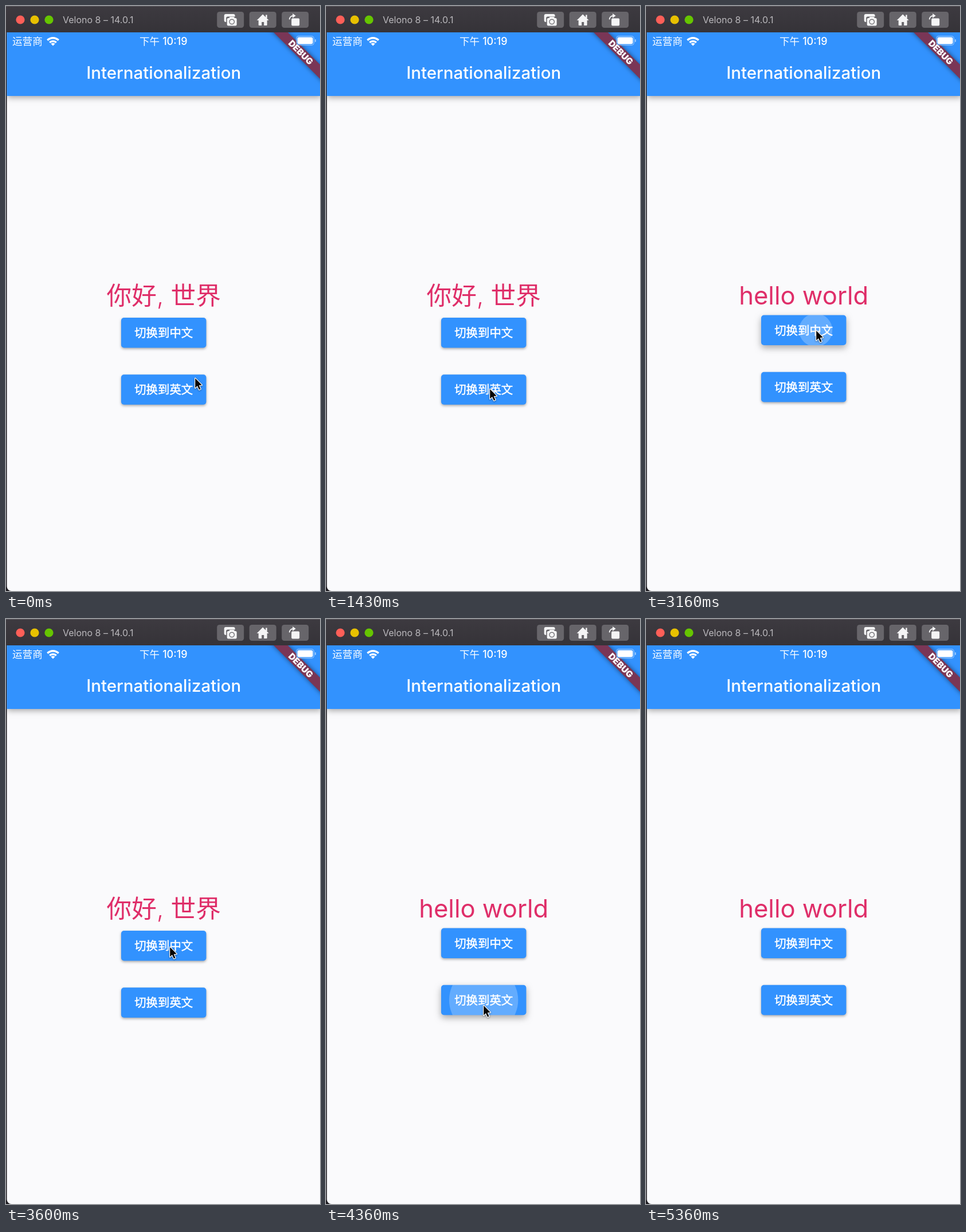
Animation of 548x1021 px, one loop 6730 ms. Source, as an HTML page with a canvas:

```html
<!DOCTYPE html>
<html lang="zh-CN">
<head>
<meta charset="utf-8">
<title>Internationalization</title>
<style>
html, body { margin: 0; width: 100%; height: 100%; overflow: hidden; background: #fafafc; }
canvas { display: block; width: 548px; height: 1021px; }
</style>
</head>
<body>
<canvas id="stage"></canvas>
<script>
const W = 548, H = 1021, LOOP = 6730;
const BAR = 46, APP_END = 157, MID = 275.2;
const BLUE = '#3292fe', PINK = '#df2e69', PAPER = '#fafafc', DARK = '#1d1b20';
const KEY = '#67656a', INK = '#f4f4f5', WHITE = '#fff';
const LATIN = 'Inter, "Noto Sans CJK SC", "Noto Sans CJK", sans-serif';
const HAN = '"Noto Sans CJK SC", "Noto Sans CJK", sans-serif';
const BUTTON = { w: 148.5, h: 52.5, gap: 99.3 };

const canvas = document.getElementById('stage');
const g = canvas.getContext('2d');
const dpr = window.devicePixelRatio || 1;
canvas.width = W * dpr;
canvas.height = H * dpr;

// A tap spreads from x on its button; the language follows when it is confirmed.
const taps = [
  { button: 1, x: 289, start: 2430, confirm: 2550 },
  { button: 0, x: 298, start: 3080, confirm: 3200 },
  { button: 1, x: 275, start: 4200, confirm: 4295 }
];

// The pointer rests between these eased moves.
const origin = { x: 329, y: 648 };
const moves = [
  { from: 30, to: 100, x: 316, y: 618 },
  { from: 300, to: 600, x: 378, y: 594 },
  { from: 600, to: 920, x: 286, y: 659 },
  { from: 1000, to: 1160, x: 285, y: 667 },
  { from: 2100, to: 2460, x: 323, y: 589 },
  { from: 2460, to: 2760, x: 296, y: 565 },
  { from: 3500, to: 3600, x: 285, y: 571 },
  { from: 3600, to: 4100, x: 274, y: 673 },
  { from: 4360, to: 4900, x: 285, y: 918 },
  { from: 4900, to: 5130, x: 28, y: 550 }
];
const FADE = 5330, GONE = 5360;

const clamp = v => Math.max(0, Math.min(1, v));
const mix = (a, b, k) => a + (b - a) * k;
const smooth = k => k * k * (3 - 2 * k);
const easeOut = k => 1 - (1 - k) ** 2;

function pointerAt(t) {
  return moves.reduce((p, m) => {
    const k = smooth(clamp((t - m.from) / (m.to - m.from)));
    return { x: mix(p.x, m.x, k), y: mix(p.y, m.y, k) };
  }, origin);
}

function box(x, y, w, h, r, fill) {
  g.beginPath();
  g.roundRect(x, y, w, h, r);
  g.fillStyle = fill;
  g.fill();
}

function disc(x, y, r, fill) {
  g.beginPath();
  g.arc(x, y, r, 0, Math.PI * 2);
  g.fillStyle = fill;
  g.fill();
}

// Arc given in quarter turns.
function ring(x, y, r, from, to, width, color) {
  g.beginPath();
  g.arc(x, y, r, from * Math.PI / 2, to * Math.PI / 2);
  g.lineWidth = width;
  g.strokeStyle = color;
  g.stroke();
}

function shape(path, fill) {
  g.fillStyle = fill;
  g.fill(new Path2D(path));
}

function label(text, x, y, font, fill, align = 'center') {
  g.font = font;
  g.fillStyle = fill;
  g.textAlign = align;
  g.fillText(text, x, y);
}

function shadow(alpha, blur, dy) {
  g.shadowColor = `rgba(0,0,0,${alpha})`;
  g.shadowBlur = blur * dpr;
  g.shadowOffsetY = dy * dpr;
}

function drawCamera(x, y) {
  box(x - 11, y - 10, 19, 14, 3, INK);
  box(x - 7.5, y - 5.5, 20, 17, 3, KEY);
  box(x - 6, y - 3, 17, 13.5, 2.5, INK);
  box(x - 2, y - 5, 9, 5, 1.5, INK);
  ring(x + 2.5, y + 3.5, 4.2, 0, 4, 1.3, KEY);
}

function drawHouse(x, y) {
  shape(`M${x - 10.5} ${y + 1}l10.5 -10.5l10.5 10.5z`, INK);
  box(x - 7.5, y, 15, 10, 1, INK);
  box(x - 2, y + 4, 4, 6, 0, KEY);
  box(x + 5, y - 8.5, 2.5, 6, 0, INK);
}

function drawRotate(x, y) {
  box(x - 6.5, y - 2.5, 14, 13, 2, INK);
  ring(x - 3.5, y - 0.5, 6.5, 2, 3, 1.8, INK);
  shape(`M${x - 4.5} ${y - 11}l5.5 4l-5.5 4z`, INK);
}

function drawTitleBar() {
  const shade = g.createLinearGradient(0, 0, 0, BAR);
  shade.addColorStop(0, '#3d3a40');
  shade.addColorStop(1, '#353338');
  g.fillStyle = shade;
  g.fillRect(0, 0, W, BAR);
  g.fillStyle = '#5b595e';
  g.fillRect(0, 0, W, 1);
  ['#fe5f58', '#e8c000', '#66c500'].forEach((c, i) => disc(25 + 25 * i, 24, 7.6, c));
  label('Velono 8 – 14.0.1', 99, 30, '400 16px ' + LATIN, '#bab8bc', 'left');
  [drawCamera, drawHouse, drawRotate].forEach((icon, i) => {
    const x = 391.7 + 56.5 * i;
    box(x - 23.5, 10, 47, 28, 4.5, KEY);
    icon(x, 24);
  });
}

function drawBanner() {
  g.save();
  g.beginPath();
  g.rect(2, BAR, W, 130);
  g.clip();
  g.translate(549.5, BAR);
  g.rotate(Math.PI / 4);
  shadow(0.5, 9, 0);
  g.fillStyle = '#7a3656';
  g.fillRect(-100, 40.8, 200, 17.5);
  g.shadowColor = 'transparent';
  label('DEBUG', 0, 55, '900 15.4px ' + LATIN, WHITE);
  g.restore();
}

function drawStatus() {
  label('运营商', 11, 68, '400 17.6px ' + HAN, WHITE, 'left');
  for (let i = 0; i < 3; i++)
    ring(82, 69.5, 2.5 + 5.6 * i, -1.5, -0.5, i ? 3.4 : 5, WHITE);
  label('下午', 233, 68, '400 17.5px ' + HAN, WHITE, 'left');
  label('10:19', 316.5, 68, '500 18px ' + LATIN, WHITE, 'right');
  box(506, 52, 32, 17, 5, 'rgba(255,255,255,.45)');
  box(507.2, 53.2, 29.6, 14.6, 4, BLUE);
  box(508.5, 54.5, 27, 12, 3, WHITE);
  box(539, 58, 2, 5, 1, 'rgba(255,255,255,.5)');
}

function drawAppBar() {
  g.save();
  shadow(0.34, 10, 3);
  g.fillStyle = BLUE;
  g.fillRect(1.5, BAR, W, APP_END - BAR);
  g.restore();
  label('Internationalization', MID, 126.6, '500 29.5px ' + LATIN, WHITE);
}

function drawRipple(tap, t, cy) {
  const age = t - tap.start, after = t - tap.confirm;
  if (age < 0 || after > 375) return;
  const slow = Math.min(age, tap.confirm - tap.start) / 2000;
  const k = easeOut(clamp(slow + Math.max(0, after) / 225));
  const alpha = 0.24 * clamp(age / 75) * clamp((375 - after) / 150);
  disc(mix(tap.x, MID, k), cy, mix(24, 88, k), `rgba(255,255,255,${alpha})`);
}

function lift(tap, t) {
  return clamp((t - tap.start) / 90) * clamp((tap.confirm + 250 - t) / 200);
}

function drawButton(index, text, top, t) {
  const y = top + BUTTON.gap * index;
  const own = taps.filter(tap => tap.button === index);
  const up = Math.max(...own.map(tap => lift(tap, t)));
  g.save();
  shadow(0.33, mix(4.5, 12, up), mix(2, 5, up));
  box(MID - BUTTON.w / 2, y, BUTTON.w, BUTTON.h, 5, BLUE);
  g.shadowColor = 'transparent';
  g.clip();
  own.forEach(tap => drawRipple(tap, t, y + BUTTON.h / 2));
  g.restore();
  label(text, MID, y + 34, '500 20.4px ' + HAN, WHITE);
  g.lineWidth = 0.5;
  g.strokeStyle = WHITE;
  g.strokeText(text, MID, y + 34);
}

function drawPointer(t) {
  if (t >= GONE) return;
  const { x, y } = pointerAt(t);
  const arrow = new Path2D('M1.2 1.8v16.8l3.8 -3.6l3 6.6l2.6 -1.2l-2.9 -6.4l5.1 -.4z');
  g.save();
  g.globalAlpha = t < FADE ? 1 : 0.5;
  g.translate(x, y);
  g.lineJoin = 'round';
  g.lineWidth = 2.4;
  g.strokeStyle = WHITE;
  shadow(0.4, 3, 1);
  g.stroke(arrow);
  g.shadowColor = 'transparent';
  g.fillStyle = '#060606';
  g.fill(arrow);
  g.restore();
}

function draw(t) {
  g.setTransform(dpr, 0, 0, dpr, 0, 0);
  g.fillStyle = DARK;
  g.fillRect(0, 0, W, H);
  box(1.5, BAR, W, H - BAR, [0, 0, 0, 8], PAPER);

  const last = taps.filter(tap => t >= tap.confirm).pop();
  const english = last !== undefined && last.button === 1;
  const top = english ? 539.5 : 544;
  if (english) label('hello world', MID, 521, '400 43.6px ' + LATIN, PINK);
  else label('你好, 世界', MID, 520.8, '350 43.7px ' + LATIN, PINK);
  drawButton(0, '切换到中文', top, t);
  drawButton(1, '切换到英文', top, t);

  drawAppBar();
  drawBanner();
  drawStatus();
  drawTitleBar();
  drawPointer(t);
}

const began = performance.now();
function tick() {
  draw((performance.now() - began) % LOOP);
  requestAnimationFrame(tick);
}
tick();
</script>
</body>
</html>
```
